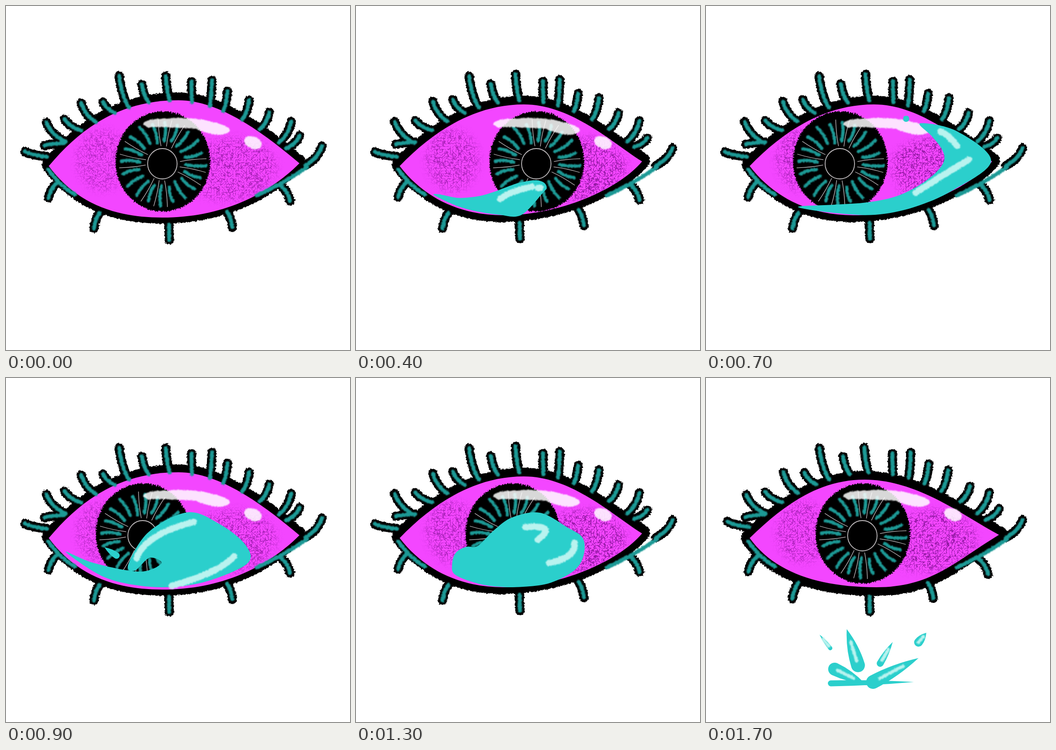
These frames come from a looping animation (748 by 748 pixels, 1800 ms). An HTML page:

```html
<!DOCTYPE html>
<html>
<head>
<meta charset="utf-8">
<style>
html, body { margin: 0; width: 100%; height: 100%; overflow: hidden; background: #fff; }
svg { display: block; width: 748px; height: 748px; }
path { stroke-linecap: round; stroke-linejoin: round; }
filter { color-interpolation-filters: sRGB; }
.line { fill: none; }
</style>
</head>
<body>
<svg viewBox="0 0 748 748">
  <defs id="defs">
    <filter id="rough" filterUnits="userSpaceOnUse" x="0" y="0" width="748" height="748">
      <feTurbulence type="fractalNoise" baseFrequency=".25" numOctaves="2" result="n"/>
      <feDisplacementMap in="SourceGraphic" in2="n" scale="6" xChannelSelector="R" yChannelSelector="G"/>
    </filter>
    <filter id="soft" filterUnits="userSpaceOnUse" x="0" y="0" width="748" height="748">
      <feTurbulence type="fractalNoise" baseFrequency=".3" numOctaves="2" result="n"/>
      <feDisplacementMap in="SourceGraphic" in2="n" scale="5" xChannelSelector="R" yChannelSelector="G"/>
      <feGaussianBlur stdDeviation="1"/>
    </filter>
  </defs>
  <g id="lids"></g>
  <g id="socket"><g id="iris"></g></g>
  <g fill="#fff" filter="url(#soft)" opacity=".85">
    <path d="M298 257Q302 245 350 244Q410 241 448 252Q486 260 487 271Q478 283 450 279Q428 274 412 267Q350 262 308 264Z"/>
    <ellipse cx="537" cy="297" rx="20" ry="13" transform="rotate(22 537 297)"/>
  </g>
  <g id="lashes"></g>
  <path id="water" fill="#2bcfcc"/>
  <path id="shine" class="line" filter="url(#soft)" stroke="#c9f7f3" opacity=".9"/>
</svg>
<script>
const PINK = '#f346ff', TEAL = '#1c9995';
const $ = id => document.getElementById(id);
const nums = text => text.split(/[ ,]+/).map(Number);
const lerp = (a, b, k) => a + (b - a) * k;
const random = n => Math.abs(Math.sin(n * 127.1) * 43758.5) % 1;
const pairs = list => list.flatMap((v, i) => i % 2 ? [] : [[v, list[i + 1]]]);

// Closed Catmull-Rom curve
function smooth(p) {
  const at = i => p[(i + p.length) % p.length];
  const near = (a, b, c) => a.map((v, k) => v + (c[k] - b[k]) / 6);
  return 'M' + p[0] + p.map((a, i) =>
    `C${near(a, at(i - 1), at(i + 1))} ${near(at(i + 1), at(i + 2), a)} ${at(i + 1)}`).join('') + 'Z';
}

const upperLid = x => 205 + 140 * Math.abs((x - 360) / 290) ** 1.9;
const lowerLid = x => 455 - 118 * ((x - 340) / 290) ** 2;

// Three drawings of the lids that alternate
const lids = [
  { rim: 15, lift: 2, grain: .65, eye: 'M93 348C165 262 250 205 375 205C470 205 570 285 638 342C570 410 470 460 340 460C230 460 150 425 93 348Z' },
  { rim: 17, lift: 2, grain: .8, eye: 'M95 348C170 270 260 214 365 214C470 214 560 300 622 338C570 400 440 455 320 455C230 455 150 420 95 348Z' },
  { rim: 19, lift: 0, grain: .8, eye: 'M95 348C175 270 250 221 345 221C460 221 560 300 637 341C540 400 490 455 370 455C250 455 150 425 95 348Z' }
];
const tips = pairs(nums('44 315,85 302,86 252,129 247,166 208,211 206,246 151,295 171,346 150,405 164,445 161,483 188,528 202,572 233,619 249,636 284,687 307'));
const lowerTips = pairs(nums('94 418,190 482,356 507,495 480,615 424'));

function lash([tx, ty], n, below) {
  const x = tx + 6 * random(n) - 3, y = ty + 6 * random(n + .5) - 3;
  const dx = below ? (350 - x) * .08 : (350 - x) * .13 + 8;
  const rootY = below ? y - 34 : upperLid(x + dx);
  return `M${x + dx} ${rootY}Q${x + dx / 4} ${lerp(y, rootY, .65)} ${x} ${y}`;
}

lids.forEach(({ rim, lift, grain, eye }, i) => {
  const hairs = tips.map((t, k) => lash(t, i * 40 + k)).join('') + lowerTips.map((t, k) => lash(t, i * 40 + k + 20, true)).join('');
  $('defs').innerHTML += `<clipPath id="eye${i}"><path d="${eye}"/></clipPath>
    <filter id="grain${i}" filterUnits="userSpaceOnUse" x="0" y="0" width="748" height="748">
      <feGaussianBlur in="SourceGraphic" stdDeviation="9" result="b"/>
      <feTurbulence baseFrequency=".17" numOctaves="2" seed="${i + 3}"/>
      <feColorMatrix values="0 0 0 0 0  0 0 0 0 0  0 0 0 0 0  -12 0 0 0 2.4" result="n"/>
      <feComposite in="b" in2="n" operator="in"/>
    </filter>`;
  $('lids').innerHTML += `<g>
    <g filter="url(#rough)">
      <path stroke="#000" stroke-width="${rim * 2}" transform="translate(0 ${-lift})" d="${eye}"/>
      <path class="line" stroke="#000" stroke-width="20" d="${hairs}"/>
    </g>
    <path fill="${PINK}" d="${eye}"/>
    <g clip-path="url(#eye${i})"><g fill="#7f0f90" opacity="${grain}" filter="url(#grain${i})">
      <ellipse cx="210" cy="335" rx="56" ry="66" opacity=".75"/>
      <ellipse cx="495" cy="350" rx="92" ry="62"/>
      <ellipse cx="480" cy="405" rx="60" ry="16"/>
    </g></g></g>`;
  $('lashes').innerHTML += `<path class="line" filter="url(#soft)" stroke="${TEAL}" stroke-width="8.5"
    d="${hairs}M92 355Q115 390 150 410M655 350Q600 388 545 412"/>`;
});

// Spokes of the iris
const spoke = (deg, r0, r1, bend) => {
  const at = (r, d) => [341 + r * Math.cos(d * Math.PI / 180), 342 + r * Math.sin(d * Math.PI / 180)];
  return `M${at(r0, deg)}Q${at((r0 + r1) / 2, deg + bend)} ${at(r1, deg)}`;
};
let teal = '', pale = '';
for (let i = 0; i < 20; i++) {
  teal += spoke(i * 18 - 105, 46 + 8 * random(i), 86 + 8 * random(i + 30), 4);
  if (i % 5 < 3) pale += spoke(i * 18 - 96, 38, 95, -2);
}
$('iris').innerHTML = `
  <ellipse cx="341" cy="338" rx="102" ry="108" filter="url(#rough)" stroke="#000" stroke-width="3" stroke-dasharray="3 2"/>
  <path class="line" filter="url(#soft)" stroke="${TEAL}" stroke-width="7" d="${teal}"/>
  <path class="line" stroke="#c4bfc2" stroke-width="1.3" d="${pale}"/>
  <ellipse cx="340" cy="343" rx="32" ry="33" stroke="#bdb9bb" stroke-width="1.8"/>`;

// Key poses: gaze offset, crest of the wave, two curved shines
const poses = [
  { at: 2, gaze: 0, crest: Array(12).fill([170, 412]).flat(), shine: Array(6).fill([175, 415]).flat() },
  { at: 5, gaze: 78,
    crest: nums('170 411,185 408,200 411,250 420,310 415,360 402,410 383,450 370,500 362,528 370,537 387,525 403'),
    shine: nums('382 422,420 395,486 382,506 386,510 386,514 385') },
  { at: 7, gaze: -49,
    crest: nums('200 437,280 432,350 427,410 415,460 392,500 362,518 335,512 310,490 282,466 255,545 272,620 337'),
    shine: nums('510 273,525 278,546 304,456 406,535 355,572 334') },
  { at: 9, gaze: -43,
    crest: nums('130 378,190 402,290 421,338 403,312 391,280 419,266 405,310 335,395 292,465 318,520 362,526 402'),
    shine: nums('284 392,302 340,408 313,360 452,460 425,496 388') },
  { at: 13, gaze: 0,
    crest: nums('216 428,209 405,217 380,240 367,265 365,300 331,340 303,400 293,460 325,493 348,495 385,475 418'),
    shine: nums('368 324,440 318,395 352,475 358,480 390,420 402') }
];

function poseAt(step) {
  const i = Math.max(1, poses.findIndex(p => p.at >= step)), a = poses[i - 1], b = poses[i];
  const k = (step - a.at) / (b.at - a.at), mix = name => pairs(a[name].map((v, j) => lerp(v, b[name][j], k)));
  return { gaze: lerp(a.gaze, b.gaze, k), crest: mix('crest'), shine: mix('shine') };
}

function wave({ crest, shine }, step) {
  const left = crest[0][0], right = crest[11][0];
  const floor = [.8, .6, .4, .2].map(k => lerp(left, right, k)).map(x => [x, lowerLid(x)]);
  const fly = step - 7;
  const spray = fly >= 0 && fly < 3 ? tear(430 - 108 * fly, 240 + 64 * fly, 440 - 97 * fly, 250 + 70 * fly, 14) : '';
  const [a, b, c, d, e, f] = shine;
  return [smooth([...crest, ...floor]) + spray, `M${a}Q${b} ${c}M${d}Q${e} ${f}`];
}

// Drop from a pointed tip to a round end
function tear(x, y, ex, ey, width) {
  const len = Math.hypot(ex - x, ey - y), r = width / 2, ux = (ex - x) / len * r, uy = (ey - y) / len * r;
  const cx = ex - ux, cy = ey - uy, mx = (x + cx) / 2, my = (y + cy) / 2;
  return `M${x} ${y}Q${mx - uy} ${my + ux} ${cx - uy} ${cy + ux}A${r} ${r} 0 0 0 ${cx + uy} ${cy - ux}Q${mx + uy} ${my - ux} ${x} ${y}Z`;
}

// Drops as tip, end, width
const splash = [[306, 546, 335, 639, 30], [247, 558, 273, 591, 9], [406, 574, 375, 627, 15], [479, 554, 456, 582, 19],
  [462, 609, 350, 668, 30], [345, 664, 267, 627, 28], [452, 661, 265, 664, 13]];

function burst(size) {
  const drops = splash.map(([x, y, ex, ey, w]) =>
    [lerp(345, x, size), lerp(668, y, size), lerp(345, ex, size), lerp(668, ey, size), w * size]);
  const glow = ([x, y, ex, ey]) => `M${lerp(x, ex, .3)} ${lerp(y, ey, .3)}L${lerp(x, ex, .75)} ${lerp(y, ey, .75)}`;
  return [drops.map(d => tear(...d)).join(''), drops.slice(0, 6).map(glow).join('')];
}

function waterAt(step) {
  if (step < 3) return ['', ''];
  if (step < 14) return wave(poseAt(step), step);
  if (step > 15) return burst((step - 15) / 2);
  const y = 430 + (step - 14) * 85;
  return [tear(345, y, 345, y + 135, 56), `M340 ${y + 75}Q332 ${y + 100} 340 ${y + 115}`];
}

let last = -1;
function draw() {
  const step = Math.floor(performance.now() % 1800 / 100);
  if (step !== last) {
    last = step;
    for (const id of ['lids', 'lashes'])
      [...$(id).children].forEach((el, i) => el.style.display = i === step % 3 ? '' : 'none');
    const gaze = step > 2 && step < 13 ? poseAt(step).gaze : 0;
    $('socket').setAttribute('clip-path', `url(#eye${step % 3})`);
    $('iris').setAttribute('transform', `translate(${gaze} 0)`);
    const [body, shine] = waterAt(step);
    $('water').setAttribute('d', body);
    $('shine').setAttribute('d', shine);
    $('shine').setAttribute('stroke-width', step > 15 ? 7 : 14);
  }
  requestAnimationFrame(draw);
}
draw();
</script>
</body>
</html>
```
